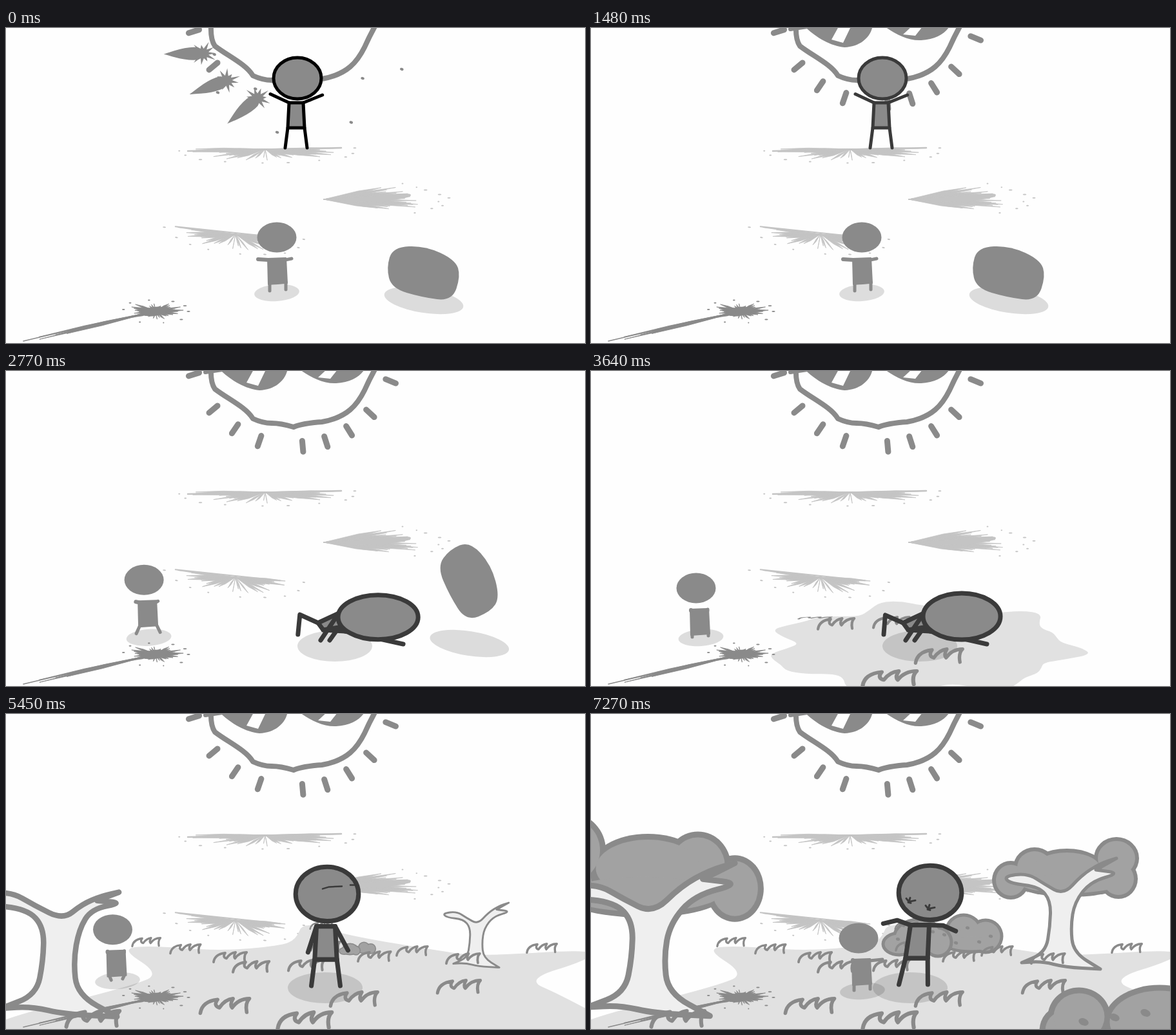
Animation, 898 px wide and 489 px high, one loop 7340 ms. Source, as an HTML page:

```html
<!DOCTYPE html>
<html lang="en">
<head>
<meta charset="utf-8">
<title>Painting the meadow</title>
<style>
html, body { margin: 0; width: 100%; height: 100%; overflow: hidden; background: #fefefe; }
svg { display: block; width: 100vw; height: 100vh; }
</style>
</head>
<body>
<svg id="stage" viewBox="0 0 898 489"></svg>
<script>
const LOOP = 7340;
const GREY = '#8a8a8a', PALE = '#c4c4c4', LEAF = '#a2a2a2', BARK = '#efefef', INK = '#3a3a3a', PAPER = '#fefefe';
const stage = document.getElementById('stage');

// Bursts of redraws: start, end, number of steps
const bursts = [[60, 610, 9], [750, 1480, 13], [1540, 2210, 10], [2300, 2950, 9], [3040, 3210, 3], [3380, 4050, 10],
  [4200, 4920, 10], [5010, 5720, 9], [5810, 6510, 9], [6600, 7040, 6], [7180, 7270, 2]];

function snap(t) {
  let last = 0;
  for (const [a, b, n] of bursts) {
    if (t < a) break;
    const step = (b - a) / (n - 1);
    last = a + Math.min(n - 1, Math.floor((t - a) / step + 1e-6)) * step;
  }
  return last;
}

// Timing and numbers
const ramp = (t, a, b) => {
  const k = Math.max(0, Math.min(1, (t - a) / (b - a)));
  return k * k * (3 - 2 * k);
};
const mix = (a, b, k) => a.map((v, i) => v + (b[i] - v) * k);
function track(keys, t) {
  let i = 0;
  while (i < keys.length - 2 && t >= keys[i + 1][0]) i++;
  return mix(keys[i][1], keys[i + 1][1], ramp(t, keys[i][0], keys[i + 1][0]));
}
function random(seed) {
  return () => {
    seed = (seed * 16807) % 2147483647;
    return seed / 2147483647;
  };
}

// Drawing helpers; points are [x, y]
const r1 = v => Math.round(v * 10) / 10;
const shape = (d, fill, stroke = 'none', w = 0) =>
  `<path d="${d}" fill="${fill}" stroke="${stroke}" stroke-width="${r1(w)}" stroke-linecap="round" stroke-linejoin="round"/>`;
const poly = pts => 'M' + pts.map(p => p.map(r1).join(' ')).join('L');
const line = (pts, c, w) => shape(poly(pts), 'none', c, w);
const group = (tr, body) => `<g transform="${tr}">${body}</g>`;
const oval = (x, y, rx, ry, fill, rot = 0, more = '') =>
  `<ellipse cx="${r1(x)}" cy="${r1(y)}" rx="${r1(rx)}" ry="${r1(ry)}" fill="${fill}" transform="rotate(${rot} ${r1(x)} ${r1(y)})" ${more}/>`;
const shadow = (x, y, rx, ry, rot) => oval(x, y, rx, ry, '#000', rot, 'fill-opacity=".13"');

// Soft outline; a point given twice becomes a sharp corner
function smooth(pts) {
  const n = pts.length, mid = i => mix(pts[i], pts[(i + 1) % n], .5).map(r1).join(' ');
  return 'M' + mid(n - 1) + pts.map((p, i) => `Q${p.map(r1).join(' ')} ${mid(i)}`).join('') + 'Z';
}

function limb(a, b, bend, c, w) {
  const [dx, dy] = [b[0] - a[0], b[1] - a[1]];
  return line([a, [a[0] + dx / 2 - dy * bend, a[1] + dy / 2 + dx * bend], b], c, w);
}

// Round lobes merged under one outline
const clump = (lobes, w) => [[w / 2, GREY], [-w / 2, LEAF]].map(([grow, c]) =>
  lobes.map(([x, y, rx, ry]) => oval(x, y, rx + grow, ry + grow, c)).join('')).join('');

function popUp(t, a, b, x, y, body) {
  if (t < a) return '';
  const u = Math.min(1, (t - a) / (b - a)), k = .15 + .85 * u + .18 * Math.sin(u * Math.PI);
  return group(`translate(${x} ${y}) scale(${k.toFixed(3)}) translate(${-x} ${-y})`, body);
}

// Dry brush splatter: hair-thin spikes within an arc, stray dots past the tips
function splatter(seed, x, y, rx, ry, from, to, n, c) {
  const rnd = random(seed);
  let s = '';
  for (let i = 0; i < n; i++) {
    const a = from + (to - from) * (i + rnd()) / n, len = .55 + .45 * rnd();
    const ex = Math.cos(a) * rx, ey = Math.sin(a) * ry, w = 1 + 1.2 * rnd();
    s += shape(poly([[x, y], [x + ex * len * .6, y + ey * len * .6 - w], [x + ex * len, y + ey * len], [x + ex * len * .6, y + ey * len * .6 + w]]) + 'Z', c, c, .8);
    if (i % 3 === 0) s += oval(x + ex * (1.1 + .2 * rnd()), y + ey * 1.2, 1 + 2 * rnd(), 1, c);
  }
  return s;
}

const splats =
  splatter(7, 402, 188, 122, 18, -.08, Math.PI + .1, 30, PALE) + line([[282, 191], [400, 188.5], [520, 186]], PALE, 2.5) +
  splatter(21, 493, 266, 160, 26, -.9, .8, 26, PALE) + shape(smooth([[495, 265], [560, 263], [628, 255], [628, 264], [560, 271]]), PALE) +
  group('rotate(6 356 320)', splatter(5, 356, 320, 92, 25, -.1, Math.PI + .1, 26, PALE) + line([[262, 318], [425, 318]], PALE, 2));
const streak =
  splatter(11, 232, 440, 46, 15, 0, Math.PI * 2, 30, GREY) + oval(230, 440, 20, 7, GREY, -8) +
  group('rotate(-13 230 440)', splatter(3, 230, 440, 205, 12, Math.PI - .35, Math.PI + .25, 8, GREY)) +
  line([[27, 486], [120, 464], [230, 440]], GREY, 1.6);

// Sun: rays stand on a circle, angles in degrees from straight down
const SUN = [446, -45];
const around = (deg, r) => [SUN[0] + Math.sin(deg * Math.PI / 180) * r, SUN[1] + Math.cos(deg * Math.PI / 180) * r];
const rayAngles = [-72, -50, -34, -19, 5, 18, 32, 47, 68];

function splash(deg) {
  const [cx, cy] = around(deg, 164), tip = around(deg + 8 * Math.sign(deg), 219);
  const base = Math.atan2(cy - tip[1], cx - tip[0]), star = [];
  for (let i = 0; i < 22; i++) {
    const a = base + i / 11 * Math.PI, r = i % 2 ? 9 : 14 + 9 * Math.abs(Math.sin(i * 3.7 + deg));
    star.push([cx + Math.cos(a) * r, cy + Math.sin(a) * r * .85]);
  }
  const sx = Math.sin(base) * 10, sy = -Math.cos(base) * 10, mid = mix(tip, [cx, cy], .55);
  return shape(poly(star) + 'Z', GREY) +
    shape(smooth([tip, tip, [mid[0] + sx, mid[1] + sy], [cx + sx, cy + sy], [cx - sx, cy - sy], [mid[0] - sx, mid[1] - sy]]), GREY);
}

function sun(t) {
  let s = shape('M318 -4Q317 18 324 28C345 44 372 56 383 74Q398 81 412 81T446 87Q460 81 490 79C530 72 545 52 556 30Q564 12 573 -4', 'none', GREY, 8);
  rayAngles.forEach((deg, i) => {
    if (t >= (i - 1) * 75) s += line([around(deg, 154), around(deg, 171)], GREY, 9);
  });
  for (let i = 0; i < 7; i++) {
    const at = (i - 2) * 80;
    if (t >= at && t < at + 200) s += splash(-59 + 19.5 * i);
  }
  const rnd = random(4);
  for (let i = 0; i < 8 && t < 420; i++) s += oval(...around(-55 + 16 * i, 150 + 70 * rnd() + t * .06), 2.8, 2, GREY, 20);
  return s + glasses(t);
}

function glasses(t) {
  if (t < 620) return '';
  let s = shape('M330 -4C345 12 370 28 393 30C418 29 434 14 437 -4Z', GREY) +
    shape('M453 -4C470 8 490 20 512 19C535 18 550 8 557 -4Z', GREY);
  if (t < 1340) {
    const rnd = random(9);
    s += shape(smooth([[270, 6], [320, -4], [430, -4], [390, 24], [310, 28], [345, 14]]), GREY) +
      shape('M462 4Q430 26 450 31M575 11L603 17M628 14Q640 -6 668 10T708 12Q690 0 668 8', 'none', GREY, 6);
    for (let i = 0; i < 6; i++) s += oval(470 + i * 14, 42 - 24 * rnd(), 4 + 3 * rnd(), 4, GREY);
    s += oval(383, 20, 3, 2, PAPER) + oval(482, 15, 3, 2, PAPER);
  } else {
    s += shape('M384 -2H403L391 23 373 18ZM497 -2H514L503 12 484 10Z', PAPER) + line([[309, 2], [335, -2]], GREY, 6);
  }
  return group(`translate(0 ${r1(-34 * (1 - ramp(t, 600, 780)))})`, s);
}

// The meadow is uncovered by a ragged, growing blot
const meadow = smooth([[-60, 486], [214, 418], [234, 400], [180, 366], [215, 359], [330, 368], [425, 360], [450, 350], [461, 322],
  [525, 343], [680, 369], [735, 376], [915, 365], [902, 382], [805, 412], [860, 436], [960, 490], [960, 540], [-60, 540]]);
function ground(t) {
  if (t < 3380) return '';
  const k = ramp(t, 3250, 3600), wide = ramp(t, 3650, 4590), blot = [];
  const rx = 228 * k + 560 * wide, ry = 66 * k + 170 * wide;
  for (let i = 0; i < 48; i++) {
    const a = i / 24 * Math.PI, r = 1 + .1 * Math.sin(a * 7 + 1) + .06 * Math.sin(a * 13);
    blot.push([515 + Math.cos(a) * rx * r, 430 + Math.sin(a) * ry * r]);
  }
  return `<clipPath id="blot"><path d="${smooth(blot)}"/></clipPath><g clip-path="url(#blot)">${shape(meadow, '#e1e1e1')}</g>`;
}

// Tufts come up one after another and are larger the nearer they stand
const tufts = [[351, 382], [437, 380], [502, 429], [420, 460], [321, 368], [300, 439], [472, 352], [605, 359], [545, 367],
  [668, 411], [254, 356], [682, 370], [195, 346], [92, 458], [471, 322], [807, 355]];
const blades = shape('M1 18Q3 5 20 3Q15 10 22 12Q28 3 37 2Q33 9 36 12Q43 2 55 2Q50 7 52 17', 'none', GREY, 4);
const grass = t => tufts.map(([x, y], i) => {
  const at = 3400 + i * 72 - 28 * Math.min(i, 4), z = .65 + (y - 322) * .0065, k = ramp(t, at, at + 90);
  return k ? group(`translate(${x} ${r1(y + 18 * z * (1 - k))}) scale(${z.toFixed(2)} ${(z * k).toFixed(2)})`, blades) : '';
}).join('');

// One tree for both places, measured from the fork; the right branch opens last
function trunk(x, y, sx, sy, open, w) {
  const tip = [82, -54], foot = [57, 118], heel = [-65, 108], notch = [50, -36];
  const pts = [[-93, -26], [-56, -31], [-30, -14], [0, 3], [28, -28], [57, -46], tip, tip, notch, notch, [88, -31], [42, -18],
    [17, 14], [11, 52], [15, 92], foot, foot, [2, 115], [-33, 106], heel, heel, [-28, 92], [-21, 52], [-20, 12], [-38, -10], [-83, -15]];
  return shape(smooth(pts.map(([px, py]) => {
    const up = px > 0 && py < 0;
    return [x + px * sx * (up ? .72 + .28 * open : 1), y + py * sy * (up ? .55 + .45 * open : 1)];
  })), BARK, GREY, w);
}
const crownLobes = [[-82, -20, 26, 27], [-45, -40, 30, 28], [5, -38, 55, 28], [10, -15, 80, 18], [82, -54, 32, 30], [85, -22, 27, 28]];
const crown = (x, y, sx, sy, w) => clump(crownLobes.map(([px, py, rx, ry]) => [x + px * sx, y + py * sy, rx * Math.abs(sx), ry * sy]), w);

const leftTree = t => popUp(t, 6600, 6860, 95, 305, crown(96, 306, -1.55, 1.75, 9)) +
  popUp(t, 5090, 5420, 95, 489, trunk(88 + 8 * ramp(t, 6550, 6860), 306, 1.55, 1.38, ramp(t, 6550, 6860), 9));
const rightTree = t => popUp(t, 5810, 6130, 733, 275, crown(733, 278, 1, 1, 6)) +
  popUp(t, 5250, 5600, 730, 390, trunk(733, 278, 1, 1, 1, 5));

function midBush(t) {
  let s = clump([[578, 338, 27, 26], [612, 345, 25, 25], [590, 356, 42, 13]], 5) +
    clump([[478, 357, 25, 17], [508, 347, 38, 28], [538, 354, 21, 22], [505, 362, 48, 11]], 5);
  for (let i = 0; i < 9; i++) if (t > 6300 + i * 80) s += oval(620 - i * 18, 345 + 13 * Math.sin(i * 2.4), 3.2, 2.4, GREY, 20);
  return popUp(t, 5330, 5640, 545, 373, s);
}
function nearBush(t) {
  let s = clump([[730, 492, 30, 34], [757, 470, 44, 41], [882, 478, 82, 53]], 9);
  for (let i = 0; i < 3; i++) if (t >= 5900 + i * 270) s += oval(764 + 48 * i, 478 - 7 * i, 8, 5.5, GREY, 22);
  return popUp(t, 5420, 5710, 810, 489, s);
}

// Rock knocked away by the landing
const boulder = shape(smooth([[590, 372], [600, 340], [650, 338], [697, 360], [705, 385], [692, 424], [645, 418], [598, 404]]), GREY);
function rock(t) {
  if (t > 3205) return '';
  const u = Math.max(0, (t - 2560) / 640), x = 310 * u, y = -55 * Math.abs(Math.sin(u * Math.PI * 2));
  return oval(648 + x, 423, 62, 19, '#dcdcdc', 9) + group(`translate(${r1(x)} ${r1(y)}) rotate(${r1(u * 220)} 647 381)`, boulder);
}

// Small figure: head x and y, lean, reach of both arms, feet and shadow below the head
const kidKeys = [[0, [420, 325, 0, 16, 10, 83, 86]], [1560, [420, 325, 0, 16, 10, 83, 86]],
  [1975, [333, 308, 5, 16, 12, 87, 105]], [2280, [333, 308, 5, 16, 12, 87, 105]],
  [2950, [163, 337, 5, 0, 0, 76, 77]], [5300, [163, 337, 5, 0, 0, 76, 77]],
  [6120, [304, 340, 4, 0, 0, 76, 82]], [6200, [304, 340, 4, 0, 0, 76, 82]],
  [7040, [415, 348, 4, 0, 20, 81, 82]], [7340, [415, 348, 4, 0, 20, 81, 82]]];

function kid(t) {
  const [x, y, lean, reachL, reachR, leg] = track(kidKeys, t);
  const pace = Math.min(1, Math.abs(track(kidKeys, t + 30)[0] - track(kidKeys, t - 30)[0]) / 5);
  const bob = -4 * pace * Math.abs(Math.sin(t / 75)), step = 6 * pace * Math.sin(t / 75);
  const c = x + lean, top = y + 33 + bob, foot = y + leg;
  return line([[c - 11, top + 37], [c - 11 + step, foot]], GREY, 5) + line([[c + 14, top + 36], [c + 14 - step, foot - 2]], GREY, 5) +
    oval(x, y + bob, 30.5, 23.5, GREY) +
    shape(poly([[c - 14, top], [c + 14, top - 1], [c + 16, top + 38], [c - 13, top + 40]]) + 'Z', GREY, GREY, 2) +
    line([[c - 13, top + 2], [c - 13 - reachL, top + 1]], GREY, 6) + line([[c + 13, top + 2], [c + 13 + reachR, top]], GREY, 5);
}
function kidShadow(t) {
  const [x, y, lean, , , , gap] = track(kidKeys, t);
  return shadow(x + lean * 1.5, y + gap, 35, 13, -4);
}

// Big figure: weight, head, then chest, hips, hands, feet, then bends of arms and legs
function upright({ x, y, s = 1, lean = 0, nod = 0, duck = 0, up = [25, 22], elbow = [0, 0], knee = 0 }) {
  const neck = y - 70 * s, hip = y - 31 * s, c = x + lean;
  const hand = (side, deg) => {
    const a = deg * Math.PI / 180;
    return [c + side * s * (11 + 32 * Math.cos(a)), neck - 32 * s * Math.sin(a)];
  };
  return [4 + (s - 1) * 8 + (s > 1 ? .5 : 1), x + nod, y - (108 - duck) * s, 37 * s, 32 * s,
    c - 11 * s, neck, c + 11 * s, neck, x + lean / 2 + 13 * s, hip, x + lean / 2 - 13 * s, hip,
    ...hand(-1, up[0]), ...hand(1, up[1]), x - 17 * s, y, x + 17 * s, y, ...elbow, knee, -knee];
}
const crouch = k => [7, 575 - 7 * k, 381 - 4 * k, 60 - 7 * k, 36 + 5 * k,
  484, 391, 516, 376, 526, 404, 492, 402, 454 + 4 * k, 409, 488, 418, 502, 418, 614 - 7 * k, 424, .7, 0, -1.2, 0];

const cheer = upright({ x: 450, y: 186, nod: 2 });
const wave = upright({ x: 451, y: 188, nod: 23, duck: 11, up: [47, -38], elbow: [0, .6] });
const leap = y => upright({ x: 466, y, s: 1.12, knee: .55 });
const still = { x: 496, s: 1.32, up: [-72, -62] };
const stand = upright({ ...still, y: 422, nod: 2 });
const smile = y => upright({ ...still, x: 500, y, lean: 10, nod: 26, up: [3, -13], elbow: [.15, -.1] });
const hop = upright({ x: 455, y: 180, nod: 8 });

const bigKeys = [[0, cheer], [60, cheer], [200, wave], [340, hop], [600, wave], [900, wave], [1100, hop], [1300, wave],
  [1480, cheer], [1640, wave], [1800, hop], [1980, leap(41)], [2055, leap(41)], [2210, leap(-90)],
  [2290, upright({ ...still, y: -60 })], [2560, stand], [2700, crouch(-.3)], [2900, crouch(0)], [3300, crouch(0)]];
for (let t = 3450, k = 1; t < 4400; t += 150, k = 1 - k) bigKeys.push([t, crouch(k)]);
bigKeys.push([4450, crouch(0)], [4590, crouch(1)], [4950, crouch(1)], [5150, upright({ ...still, y: 412 })], [5300, stand],
  [6550, stand], [6800, smile(420)], [7040, smile(422)], [7180, smile(417)], [7265, smile(420)], [LOOP, smile(420)]);

function big(t) {
  const p = track(bigKeys, t), [w, x, y, rx, ry] = p, v = Math.round(58 * ramp(t, 60, 700)), c = `rgb(${v},${v},${v})`;
  const pt = i => p.slice(5 + 2 * i, 7 + 2 * i);
  let s = shape(poly([0, 1, 2, 3].map(pt)) + 'Z', GREY, c, w);
  [0, 1, 3, 2].forEach((joint, i) => s += limb(pt(joint), pt(4 + i), p[21 + i], c, w));
  s += oval(x, y, rx, ry, GREY, 0, `stroke="${c}" stroke-width="${r1(w)}"`);
  if (t > 5200 && t < 6600)
    s += line([[x - 7, y - 8], [x + 3, y - 11], [x + 23, y - 12]], INK, 2.5) + line([[x + 36, y - 14], [x + 45, y - 14]], INK, 2.5);
  if (t > 6700)
    for (const [ex, ey] of [[-33, 14], [-3, 25]])
      s += group(`translate(${r1(x + ex)} ${r1(y + ey)})`, shape('M-4 -5L0 0 10 -2M0 0L2 -6M-1 1L3 2', 'none', INK, 3));
  return s;
}
function bigShadow(t) {
  const k = .17 * ramp(t, 1850, 1980) + .83 * ramp(t, 2060, 2560), rise = ramp(t, 4950, 5250);
  return shadow(469 + 41 * ramp(t, 2060, 2560) - 15 * rise, 385 + 42 * ramp(t, 2060, 2560) - 2 * rise, 58 * k, 24 * k, 0);
}

function draw(t) {
  stage.innerHTML = `<rect width="898" height="489" fill="${PAPER}"/>` + sun(t) + splats + ground(t) + streak +
    kidShadow(t) + rock(t) + midBush(t) + rightTree(t) + bigShadow(t) + leftTree(t) + grass(t) +
    kid(t) + big(t) + nearBush(t);
}

let shown = -1;
const start = performance.now();
function tick() {
  const t = snap((performance.now() - start) % LOOP);
  if (t !== shown) draw(shown = t);
  requestAnimationFrame(tick);
}
tick();
</script>
</body>
</html>
```
